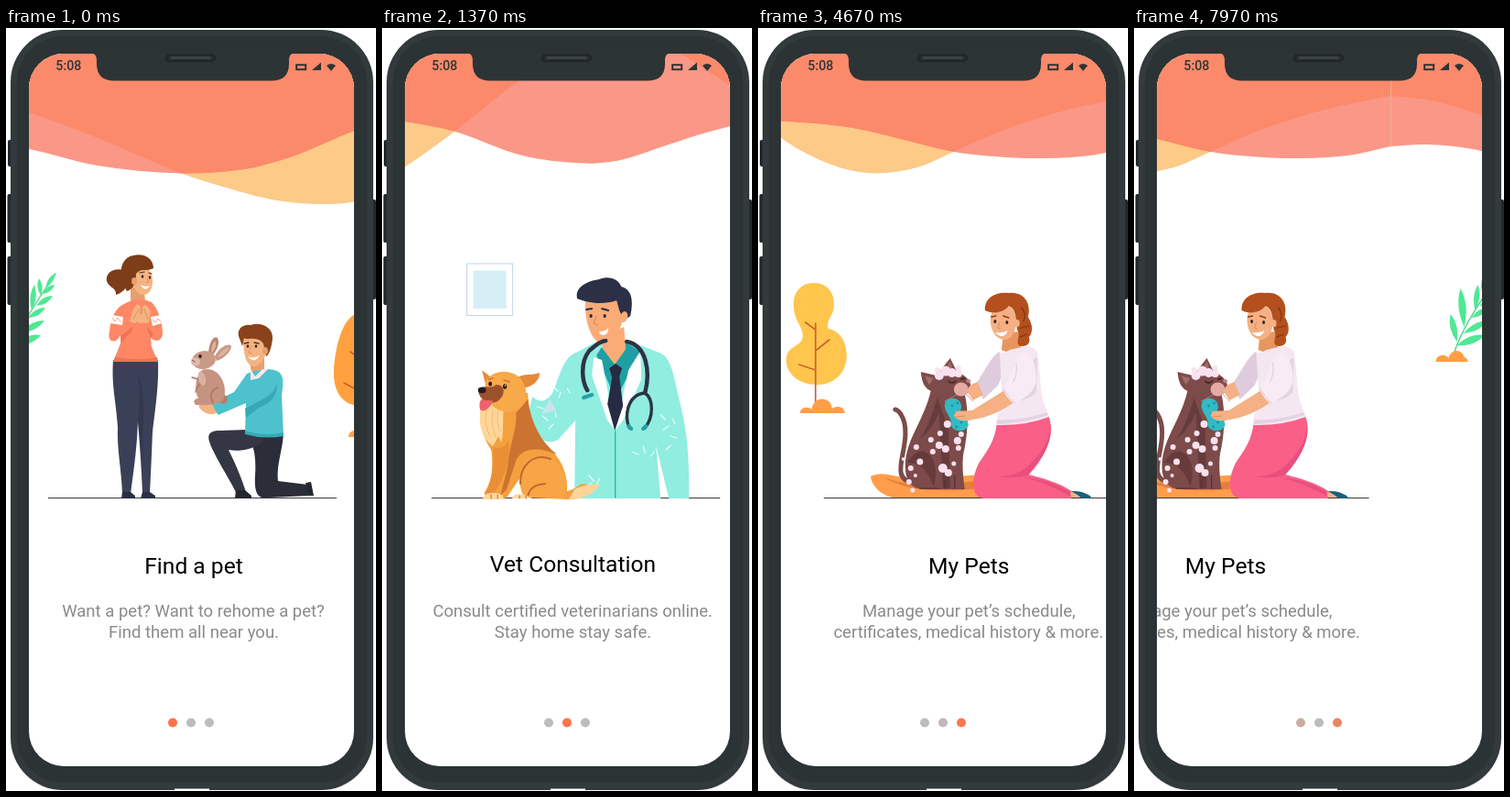
An HTML page that plays this animation: 404 by 832 pixels, repeating every 8 s.

```html
<!DOCTYPE html>
<html lang="en">
<head>
<meta charset="utf-8">
<title>Pet app onboarding</title>
<style>
html, body { margin: 0; width: 100%; height: 100%; overflow: hidden; background: #fff; }
svg { display: block; width: 404px; height: 832px; }
text { font-family: Roboto, "Liberation Sans", sans-serif; text-anchor: middle; }
.title { font-size: 24.6px; fill: #000; }
.body { font-size: 18.55px; fill: #8a8a8a; }
.clock { font-size: 14.2px; font-weight: 500; fill: #333; }
</style>
</head>
<body>
<svg id="stage" viewBox="0 0 404 832" xmlns="http://www.w3.org/2000/svg"></svg>
<script>
const fill = (color, d) => `<path d="${d}" fill="${color}"/>`;
const line = (color, w, d) =>
  `<path d="${d}" fill="none" stroke="${color}" stroke-width="${w}" stroke-linecap="round" stroke-linejoin="round"/>`;
const oval = (color, x, y, rx, ry = rx, turn = 0) =>
  `<ellipse cx="${x}" cy="${y}" rx="${rx}" ry="${ry}" fill="${color}" transform="rotate(${turn} ${x} ${y})"/>`;
const box = (color, x, y, w, h, r = 0, more = '') =>
  `<rect x="${x}" y="${y}" width="${w}" height="${h}" rx="${r}" fill="${color}" ${more}/>`;
const copy = (x, y, type, str) => `<text x="${x}" y="${y}" class="${type}">${str}</text>`;
const floor = x => box('#3a3a3a', x, 512, 315, 1);

// A pointed leaf from (x, y) to its tip
function leaf(x, y, tx, ty, w) {
  const dx = tx - x, dy = ty - y, n = Math.hypot(dx, dy);
  const mx = x + dx * .55, my = y + dy * .55, ox = -dy / n * w, oy = dx / n * w;
  return fill('#4fe893', `M${x} ${y}Q${mx + ox} ${my + oy} ${tx} ${ty}Q${mx - ox} ${my - oy} ${x} ${y}Z`);
}

// Smooth curve through points, as path segments
function curve(pts) {
  const at = i => pts[Math.max(0, Math.min(pts.length - 1, i))];
  let d = `L${pts[0]}`;
  for (let i = 0; i < pts.length - 1; i++) {
    const [a, b, c, e] = [at(i - 1), at(i), at(i + 1), at(i + 2)];
    const k = (c[0] - b[0]) / 3;
    const s1 = (c[1] - a[1]) / (c[0] - a[0]), s2 = (e[1] - b[1]) / (e[0] - b[0]);
    d += `C${b[0] + k} ${b[1] + k * s1} ${c[0] - k} ${c[1] - k * s2} ${c}`;
  }
  return d;
}
const wave = pts => `M-64 -20${curve(pts)}L1295 -20Z`;

const pinkWave = wave([[-64, 129], [-25, 127], [25, 132], [100, 150], [190, 158.5], [260, 154], [310, 141],
  [347, 126], [380, 112], [417, 101], [450, 99], [474, 102], [529, 113], [602, 139], [669, 147.5], [709, 144],
  [759, 128], [803, 114], [840, 105], [883, 101.5], [933, 103], [988, 109], [1048, 123], [1098, 135],
  [1148, 140.5], [1198, 142], [1248, 139], [1295, 129]]);
const goldWave = wave([[-64, 74], [-20, 79], [25, 92], [100, 120], [190, 158], [240, 174], [290, 187], [340, 192],
  [380, 189.5], [432, 176], [482, 146], [529, 112], [582, 70], [632, 34], [660, 18], [708, 5], [750, 13],
  [784, 34], [829, 63], [888, 104], [928, 132], [973, 152], [1013, 158.5], [1058, 152], [1098, 135],
  [1148, 113], [1208, 93], [1250, 83], [1295, 74]]);

const waves = fill('#fdca88', goldWave) + fill('#fb9786', pinkWave) +
  `<g clip-path="url(#over)">${fill('#fb8a6a', pinkWave)}</g>` + line('#f0ad93', .9, 'M-64 57V129');

// Page 1
const plant = line('#45cf84', 1.3, 'M5 354C13 330 28 306 54 268') +
  [[8, 342, 1, 312, 7], [16, 326, 12, 284, 8], [28, 308, 31, 280, 6], [38, 292, 36, 273, 5], [43, 284, 54, 267, 5],
   [8, 346, 38, 335, 8], [15, 333, 42, 319, 7], [24, 316, 43, 305, 6], [33, 303, 51, 292, 6], [40, 290, 53, 280, 5]]
    .map(a => leaf(...a)).join('') +
  fill('#ff9f45', 'M-15 364C-15 355 -3 355 -1 360C2 348 17 350 17 364ZM8 364C8 357 20 357 20 364Z');

const eggTree = fill('#ffa13e', 'M387 311C402 311 409 336 412 364C416 391 405 412 387 412C370 412 357 399 358 374C359 349 368 311 387 311Z') +
  line('#cf5a32', 1.6, 'M388 353V444M388 362L376 353M388 375L403 364M388 397L369 387') +
  fill('#ff9f45', 'M374 446C374 439 382 437 386 441C390 430 414 430 414 446Z');

const woman =
  fill('#7d3d18', 'M130 265C120 260 108 266 110 276C112 283 121 283 120 291C129 288 135 281 134 269Z') +
  fill('#e99f6d', 'M136 281L151 287L152 298Q145 302 136 298Z') +
  oval('#f4b382', 149, 275, 11, 16, -6) +
  fill('#7d3d18', 'M132 287C122 272 123 251 139 248C150 245 161 251 161 262C154 266 147 261 142 268C142 278 139 285 132 287Z') +
  oval('#e99f6d', 140, 276, 3, 4) +
  line('#57301b', 1.2, 'M146 267L151 266M156 267L159 268') + oval('#3b2620', 149, 271, 1.3, 1.7) + oval('#3b2620', 157, 272, 1.2, 1.7) +
  line('#dd8e61', 1, 'M154 273L156 277L153 278') + fill('#fff', 'M147 280Q153 283 157 281Q152 289 147 280Z') +
  fill('#3a4058', 'M117 362H166C167 390 163 415 160 440C159 465 158 488 157 508H149C148 480 146 455 144 428C143 460 139 485 136 508H127C126 480 121 460 122 435C120 405 115 390 117 362Z') +
  fill('#32384d', 'M144 428C146 412 147 400 144 375C151 395 151 420 149 440L150 480Z') +
  fill('#2a2f42', 'M127 506H136L141 510V513H126ZM149 506H157L163 510V513H147Z') +
  fill('#fe8766', 'M127 302Q144 292 159 299C166 306 171 320 171 334C169 343 163 342 158 338L159 348L166 364H117L125 344L125 335C119 346 110 342 113 331C114 318 119 306 127 302Z') +
  fill('#ef7455', 'M125 336L139 325L137 331L126 343ZM158 338L153 325L161 333ZM119 359Q144 363 165 359L166 364H117Z') +
  fill('#fff', 'M115 313L128 315L127 324L114 322ZM158 315L168 313L170 322L160 325Z') +
  line('#f7a18f', 1, 'M116 316l3 4 3-4 3 4M160 318l3 3 3-4 3 3') +
  fill('#f4b382', 'M135 320L139 307Q144 298 147 304L146 314L141 322ZM156 321L158 309Q152 298 149 304L148 315L151 322Z') +
  line('#dd8e61', .9, 'M139 317L145 307M155 318L151 307') + oval('#f4b382', 147, 317, 6, 5);

const bunny =
  fill('#b98773', 'M221 354C222 342 227 335 231 338C234 343 230 353 225 357Z') +
  fill('#c99a86', 'M228 358C233 348 243 343 246 347C246 353 237 361 230 363Z') +
  fill('#dfb4a3', 'M224 352C225 344 228 340 229 342C230 347 227 352 225 354ZM232 357Q238 349 244 348Q240 356 232 359Z') +
  oval('#b07e6b', 237, 405, 5) +
  fill('#c59380', 'M214 373C228 368 240 382 239 398C239 409 230 412 207 411C203 406 207 404 210 404C205 394 207 380 214 373Z') +
  oval('#c99a86', 216, 362, 13, 10, -10) + oval('#e0b9aa', 207, 364, 5, 4.5) +
  oval('#33241f', 212, 358, 1.8, 2.1) + line('#7a5044', 1, 'M203 362L206 364') +
  line('#a57261', 1.4, 'M216 385Q208 390 207 397M226 409Q220 397 231 392M210 383L203 381') +
  oval('#dab0a0', 214, 382, 4, 8, -12);

const man =
  fill('#2b2e38', 'M262 438L303 441C302 462 295 476 297 494L330 498L331 510L288 512C274 515 271 506 272 488C273 474 272 462 268 452Z') +
  fill('#343743', 'M285 441C281 458 258 463 243 460C250 474 257 490 262 506H251C243 490 226 464 222 451C219 441 225 439 234 439L264 438Z') +
  fill('#25272f', 'M251 504H261L268 510V513H250ZM327 496L333 495L336 510L331 510Z') +
  fill('#e99f6d', 'M266 362L282 360L282 376L268 378Z') +
  fill('#4dc2cd', 'M263 377Q284 369 296 374C304 378 303 388 301 400L303 444Q282 449 261 442L262 409L232 422L222 410L249 397Z') +
  fill('#35a9b6', 'M261 415L282 404Q295 396 296 386Q297 407 276 414L262 425ZM261 439Q282 446 303 441V445Q282 449 261 443Z') +
  fill('#fbe5ef', 'M267 372L272 380L280 372L286 372L276 382L267 384Z') +
  fill('#f4b382', 'M211 411Q220 404 225 410L230 420Q219 424 211 414Z') +
  fill('#f4b382', 'M259 337L284 338C287 354 281 366 272 369C263 369 259 359 259 337Z') +
  fill('#8a421a', 'M254 336C252 327 260 323 267 324C278 320 292 326 291 339C290 348 287 357 284 358L281 344C274 335 264 341 260 338L258 347Z') +
  oval('#e99f6d', 283, 352, 3, 4) + line('#57301b', 1.3, 'M260 344L265 343M271 343L276 344') +
  oval('#38241d', 264, 347, 1.3, 1.7) + oval('#38241d', 273, 347, 1.3, 1.7) +
  line('#dd8e61', 1, 'M268 347L265 354L268 355') + fill('#fff', 'M264 358Q270 361 277 357Q271 367 264 358Z');

const page1 = plant + eggTree + floor(46) + woman + man + bunny +
  copy(205, 595, 'title', 'Find a pet') +
  copy(204.5, 642, 'body', 'Want a pet? Want to rehome a pet?') + copy(205, 664.5, 'body', 'Find them all near you.');

// Page 2
const doctor =
  fill('#90eddf', 'M232 343L272 342L305 355C314 360 318 375 322 395C329 425 336 445 335 513H313L299 455L304 513H210L211 428L192 449C180 456 164 447 158 428L164 402Q176 413 186 398C195 378 197 358 214 353Z') +
  fill('#c8e4ef', 'M174 421L183 405L190 417Z') +
  fill('#1f9fa3', 'M239 349L268 344L282 353L255 405L234 357Z') +
  fill('#fbab76', 'M239 336L264 326L266 350L254 367L241 350Z') +
  fill('#fff', 'M231 359L240 362L254 438L246 428L229 379ZM282 352L269 373L255 438L263 428L283 383Z') +
  fill('#262b43', 'M248 371L255 366L262 371L259 380L263 412L254 439L246 410L251 381Z') +
  line('#2bb0ad', 1.3, 'M254.5 440V512') +
  fill('#fbab76', 'M222 298C221 317 226 338 239 345C251 344 262 332 264 309L257 291Z') +
  fill('#2b3047', 'M213 295C210 284 222 276 237 274C247 270 258 273 261 282C274 285 274 300 271 314L264 319L259 308L256 297C240 303 222 299 213 295Z') +
  oval('#fbab76', 264, 315, 4, 6, 15) +
  line('#2b3047', 2, 'M223 307L229 306M240 306L247 308') + oval('#232638', 228, 314, 1.6, 2) + oval('#232638', 243, 314, 1.6, 2) +
  line('#e68a58', 1.3, 'M234 314L231 322L235 324') + fill('#fff', 'M237 331Q243 331 247 327Q247 337 238 334Z') +
  line('#2c3446', 4.5, 'M224 395C218 385 216 365 226 352C236 343 241 341 244 341M267 342C289 346 293 375 287 398') +
  line('#2c3446', 3.4, 'M287 398C267 400 264 425 270 436M287 398C297 405 296 425 287 436') +
  line('#26a0a8', 4, 'M269 434L272 437M288 434L285 437M220 403L229 400') +
  line('#e5fffb', 1.2, 'M186 390l6 6M195 397l-2 6M202 393l3 5M175 423l6 5M187 432l-5 5M169 413l7 2M190 424l-1-5M226 488l5 6M237 491l-3 8M223 499l6-3M273 462l7 3M285 456l2 7M297 462l-4 5M307 438l6-4M315 445l6 2M310 460l5-5M320 432l-3-6M304 422l5 5');

const dog =
  fill('#f5a03f', 'M180 505C195 510 209 504 217 497L236 499Q224 515 202 514L179 513Z') +
  fill('#ffd69a', 'M210 503Q225 496 238 498Q226 514 204 514Z') +
  fill('#f5a03f', 'M110 402C103 425 110 447 119 460C122 480 119 495 112 506C109 515 128 515 136 512L151 490L158 512L200 513C206 496 198 472 185 461C169 450 161 432 159 398Z') +
  fill('#cd7331', 'M159 405C163 433 175 453 191 465C170 456 150 457 145 475L136 503L129 510L137 479C139 452 148 437 146 420Z') +
  fill('#ea8f35', 'M121 457Q135 461 138 448Q140 475 130 494L122 508L112 509Q123 491 121 457Z') +
  fill('#f7a545', 'M155 512C143 487 154 465 172 467C195 468 207 493 198 513Z') +
  line('#c16a2e', 2, 'M151 497C150 477 165 463 184 470M159 511Q161 498 178 497') +
  fill('#ffd69a', 'M109 411C103 431 109 448 121 456L127 445L130 452C134 437 130 424 134 410Z') +
  line('#f5ba70', 1, 'M114 417Q110 432 118 445M121 417Q118 432 124 446M127 415Q124 430 129 440') +
  fill('#e58a38', 'M145 382C155 376 165 379 172 376C172 387 159 394 148 393ZM119 381L109 373L113 389Z') +
  fill('#f8a94a', 'M113 385C122 371 145 372 153 385C163 402 155 417 139 419C122 419 109 404 113 385Z') +
  fill('#9b512b', 'M105 393C112 389 120 394 124 389C134 388 136 400 126 407C115 412 104 404 105 393Z') +
  fill('#ef6269', 'M108 405C116 407 120 405 121 407C117 415 111 420 107 416Q105 410 108 405Z') +
  oval('#241b1b', 109, 395, 4.3, 3.3) + oval('#2b1d18', 118, 388, 2, 2.6) + oval('#2b1d18', 134, 391, 2.2, 2.8) +
  oval('#fff', 134.5, 390, .7) + line('#c87535', 1.4, 'M116 383L121 382M133 384L139 386') +
  fill('#ffd69a', 'M112 509Q123 504 132 510V514H109ZM143 510Q153 506 164 513H142Z') +
  line('#b76632', 1, 'M119 509V513M126 509V513M150 510V513M157 510V513');

const page2 = box('#fff', 92.5, 257, 50, 56.5, 0, 'stroke="#c2d3e4"') + box('#d7eff4', 99.5, 264.5, 36, 41.5) +
  floor(54) + doctor + dog +
  copy(208.3, 593, 'title', 'Vet Consultation') +
  copy(208, 642, 'body', 'Consult certified veterinarians online.') + copy(208.3, 664.5, 'body', 'Stay home stay safe.');

// Page 3
const pearTree = fill('#ffc54c', 'M37 278C53 278 60 290 59 304C58 315 50 319 53 328C64 330 73 340 73 357C73 376 59 389 41 389C22 389 7 378 7 362C7 346 24 348 25 337C26 326 15 319 15 302C15 288 23 278 37 278Z') +
  line('#cf642d', 1.7, 'M39 322V416M39 329L28 321M39 352L54 340M39 373L21 367') +
  fill('#ff9d4b', 'M22 420C23 412 32 413 35 416C36 401 56 401 57 415C62 411 71 413 71 420Z');

const basin = fill('#ff9d4b', 'M99 489C112 482 125 490 148 492L220 487V512H123C109 508 101 500 99 489Z') +
  fill('#e87d3a', 'M114 490Q151 505 219 493V502Q144 510 114 490Z');

const cat = line('#7c4b4a', 5, 'M147 496C119 493 139 464 137 439C137 427 131 417 126 416') +
  fill('#7c4b4a', 'M166 390C160 426 137 447 137 478C137 495 145 504 161 503H202C200 488 198 471 202 457C207 432 205 406 200 393Z') +
  fill('#673b3b', 'M172 403Q164 432 153 448Q167 437 174 419L178 502H186L184 437ZM139 474Q152 454 164 466Q174 478 168 501Q159 473 139 474Z') +
  fill('#7c4b4a', 'M154 375L171 379L186 360L193 374C203 379 211 386 208 395C200 405 178 406 168 397C157 394 155 385 154 375Z') +
  fill('#a16b69', 'M158 379L168 382L163 389ZM182 371L186 363L189 373Z') +
  line('#392425', 1.3, 'M184 385Q188 389 192 385M198 383L202 382') +
  line('#b58681', .8, 'M193 400L180 407M203 399L211 407') +
  oval('#e5aaa6', 198, 394, 8, 7.5) + oval('#c28180', 206, 385, 2.5, 2) +
  line('#543030', 1.2, 'M180 493V502M191 488V502M153 502H175');

const foam = [[174, 379, 5], [181, 374, 5.5], [188, 376, 5], [195, 377, 4], [172, 373, 3], [195, 371, 3],
  [183, 432, 4], [175, 442, 3], [165, 449, 3], [174, 455, 4], [181, 459, 4], [167, 462, 3], [149, 457, 3],
  [153, 473, 3.5], [143, 480, 3], [141, 495, 3], [148, 488, 2], [178, 480, 5], [184, 485, 4], [190, 475, 2.5],
  [194, 450, 4], [198, 443, 3], [195, 458, 3], [145, 504, 2.5], [135, 470, 2]]
  .map(a => oval('#f8e2ef', ...a)).join('');

const washer =
  fill('#deccdd', 'M239 353C228 362 222 378 214 388L222 405L238 390L251 361Z') +
  fill('#f5b084', 'M216 386Q207 388 204 396L211 406L222 400Z') +
  fill('#f95f87', 'M237 431L293 422C301 440 293 464 272 487C286 491 305 495 320 506L318 513H224C208 513 209 491 217 475C227 460 235 450 237 431Z') +
  fill('#e94f7d', 'M293 424C300 442 287 465 267 481Q255 489 239 489Q255 492 270 488C292 465 301 443 293 424ZM265 490Q295 492 317 506L318 511Q290 495 265 490Z') +
  fill('#f5b084', 'M317 506L333 508L333 512H318Z') + fill('#1d5d7d', 'M318 505Q331 504 340 511L338 513H330L325 509Z') +
  fill('#e8965f', 'M244 333L261 331L264 350Q253 357 242 351Z') +
  fill('#f5e7f2', 'M240 354Q247 354 251 351L264 348Q275 345 281 353C284 370 284 390 287 405L294 424Q268 434 236 433C238 416 244 405 242 390Z') +
  fill('#e3d2e2', 'M272 365Q284 388 266 397L251 408Q273 406 280 397L281 359ZM238 427Q262 429 292 419L293 422Q267 431 237 432Z') +
  fill('#32bac5', 'M182 406C189 401 200 405 198 415C195 421 206 425 206 433C203 442 188 441 187 432C189 424 175 416 182 406Z') +
  [[188, 412], [194, 409], [192, 420], [198, 430], [193, 435]].map(([x, y]) => oval('#1595a5', x, y, 1.4)).join('') +
  fill('#f5b084', 'M247 394L256 408Q233 424 211 427Q196 431 190 423L192 418L210 417Z') +
  line('#df8b5c', 1, 'M192 424L202 423') +
  fill('#f8ebf5', 'M263 355C253 365 255 382 243 391Q246 403 256 410C268 403 280 396 280 382C280 367 275 352 263 355Z') +
  line('#dfcada', 1, 'M244 392Q249 403 257 409M258 365Q260 377 255 386') +
  oval('#f5b084', 244, 320, 14, 20, -5) +
  fill('#b3501d', 'M224 308C223 295 235 287 250 289C267 287 275 301 271 315C277 324 276 333 272 337C275 345 267 349 261 346C257 341 264 335 259 329C258 317 258 306 250 303C244 311 232 312 224 308Z') +
  line('#823511', 1.2, 'M263 327L272 325M262 337L270 334M264 305Q270 312 266 320') +
  oval('#f5b084', 259, 322, 3, 4) +
  line('#843c1d', 1.4, 'M231 315L236 314M244 314L250 316') + oval('#37231e', 235, 320, 1.5, 2) + oval('#37231e', 248, 321, 1.5, 2) +
  line('#df8b5c', 1, 'M240 321L238 327L241 328') + fill('#fff', 'M235 332Q243 333 249 330Q244 341 235 332Z');

const page3 = pearTree + floor(48) + basin + cat + foam + washer +
  copy(206.5, 595, 'title', 'My Pets') +
  copy(206.5, 642, 'body', 'Manage your pet’s schedule,') + copy(206, 664.5, 'body', 'certificates, medical history &amp; more.');

// Phone and stage
const LOOP = 8000, PITCH = 1359, SPAN = 917, STEP = 30;
const shift = (x, art) => `<g transform="translate(${x})">${art}</g>`;
const body = box('#22292a', 2, 122, 5, 29, 2) + box('#22292a', 1.5, 181, 5, 53, 2) + box('#22292a', 1.5, 249, 5, 53, 2) +
  box('#22292a', 399, 187, 5, 109, 2) + box('#333a3b', 5, 2, 396, 829, 57) +
  box('#2c3334', 12, 9, 382, 814, 50) + box('#fff', 184, 829.5, 38, 3);
const notch = fill('#2d3435', 'M93 27Q99 28 99 35V39Q99 57.5 118 57.5H290Q309 57.5 309 39V35Q309 28 315 27Z') +
  box('#262c2d', 174.5, 29, 54, 7.5, 3.7, 'stroke="#1a2021"') + box('#3a4243', 179, 31, 45, 3, 1.5);
const status = copy(68.3, 46, 'clock', '5:08') + box('none', 317.2, 40.2, 10, 5, 0, 'stroke="#333" stroke-width="2"') +
  fill('#333', 'M334 46L344 37.5V46ZM350 41Q355 37 360 41L355 47Z');

const stage = document.getElementById('stage');
stage.innerHTML = `<defs>
  <clipPath id="over"><path d="${goldWave}"/></clipPath>
  <clipPath id="screen"><rect x="25" y="28" width="355" height="777" rx="38"/></clipPath></defs>` +
  body + `<g clip-path="url(#screen)">${box('#fff', 25, 28, 355, 777)}<g id="strip">` +
  waves + shift(PITCH, waves) + page1 + shift(449, page2) + shift(908, page3) + shift(PITCH, page1) +
  `</g></g>` + notch + status +
  [182, 202, 222].map(x => `<circle class="dot" cx="${x}" cy="757.5" r="5"/>`).join('');
const strip = document.getElementById('strip');
const dots = [...document.querySelectorAll('.dot')];

// cubic-bezier(.45, 0, .15, 1)
function ease(x) {
  if (x <= 0) return 0;
  if (x >= 1) return 1;
  let lo = 0, hi = 1, s;
  for (let i = 0; i < 24; i++) {
    s = (lo + hi) / 2;
    const bx = 1.35 * (1 - s) ** 2 * s + .45 * (1 - s) * s * s + s ** 3;
    if (bx < x) lo = s; else hi = s;
  }
  return 3 * (1 - s) * s * s + s ** 3;
}

// Start time, lead into the curve, scroll from, scroll to
const moves = [[500, 20, 0, 449], [4100, 80, 449, 908], [7730, 0, 908, PITCH]];
const idle = [189, 189, 189], active = [252, 116, 73];

function draw(t) {
  let scroll = 0, weight = [1, 0, 0];
  moves.forEach(([start, lead, from, to], i) => {
    if (t < start) return;
    const p = ease((Math.floor((t - start) / STEP) * STEP + lead) / SPAN);
    scroll = from + (to - from) * p;
    weight = [0, 0, 0];
    weight[i] = 1 - p;
    weight[(i + 1) % 3] = p;
  });
  strip.setAttribute('transform', `translate(${-scroll.toFixed(2)})`);
  dots.forEach((dot, i) => {
    const rgb = idle.map((c, k) => Math.round(c + (active[k] - c) * weight[i]));
    dot.setAttribute('fill', `rgb(${rgb})`);
  });
}

const begin = performance.now();
function tick() {
  draw((performance.now() - begin) % LOOP);
  requestAnimationFrame(tick);
}
tick();
</script>
</body>
</html>
```
